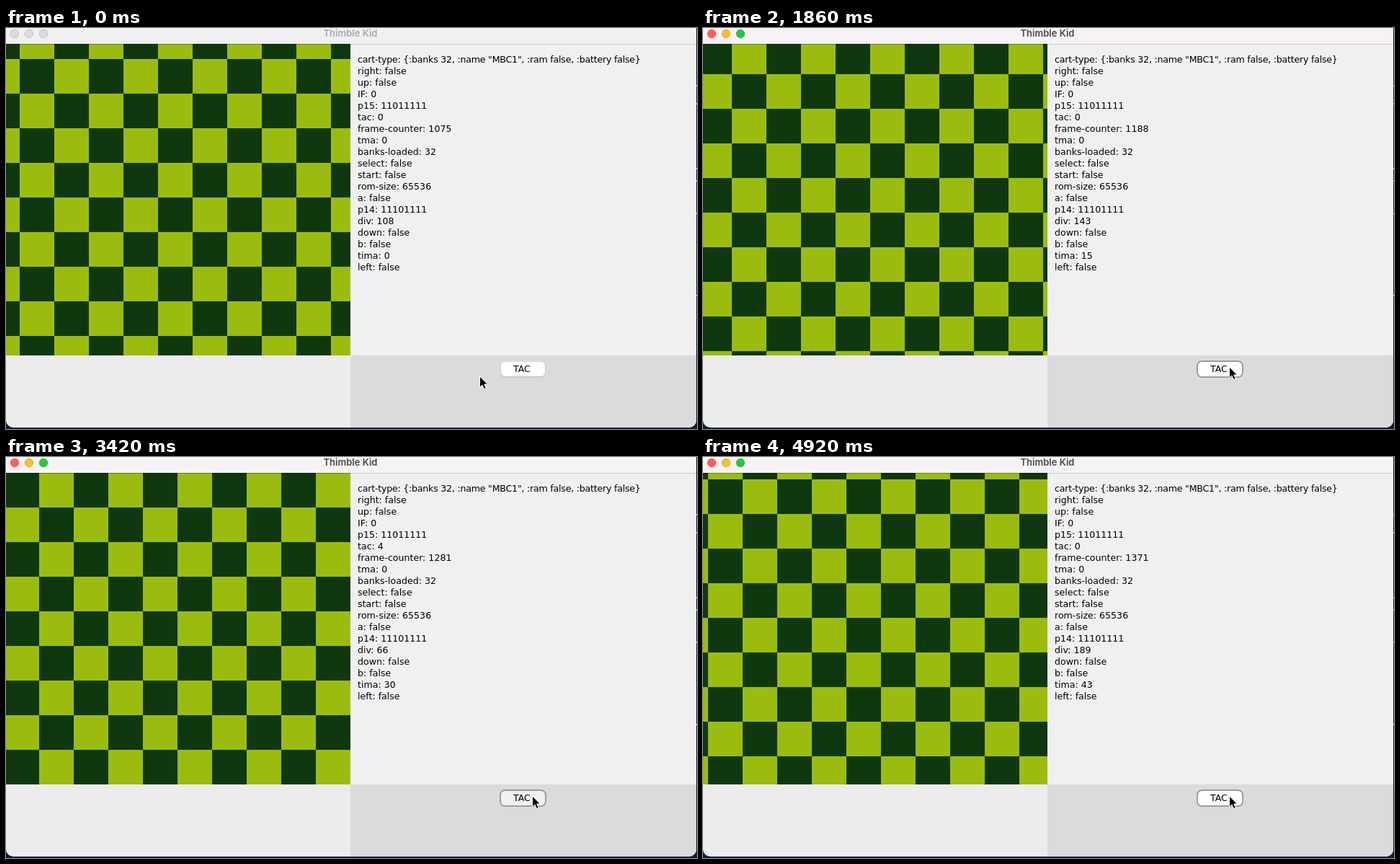
An HTML page that plays this animation: 959x556 px, repeating every 4940 ms.

```html
<!DOCTYPE html>
<html lang="en">
<head>
<meta charset="utf-8">
<title>Thimble Kid</title>
<style>
  html, body { margin: 0; width: 100%; height: 100%; overflow: hidden; background: #0b1f3a; }
  svg { display: block; width: 959px; height: 556px; }
  text { font: 12.6px "DejaVu Sans", sans-serif; fill: #000; white-space: pre; }
  .title { font: 600 13px Inter, sans-serif; fill: #4a474a; text-anchor: middle; }
  .bar { fill: #f7f2f6; }
  .ring { fill: #a8989e; }
  .face { fill: #fff; }
  .pressed .face { fill: #f0f0f0; }
  .idle .bar { fill: #f0f0f0; }
  .idle .title { fill: #a9a9a9; }
  .idle .light { fill: #dcdcdc; stroke: #b9b9b9; }
  .idle .ring { fill: none; }
  .light { stroke-width: .8; }
</style>
</head>
<body>
<svg id="stage" class="idle" viewBox="0 0 959 556">
  <defs>
    <pattern id="checker" width="96" height="96" patternUnits="userSpaceOnUse">
      <path d="M0 0h96v96h-96z" fill="#9bbc0f" shape-rendering="crispEdges"/>
      <path d="M0 0h48v96h48v-48h-96z" fill="#0f380f" shape-rendering="crispEdges"/>
    </pattern>
    <clipPath id="window"><path d="M0 0H958V544a10 10 0 0 1-10 10H10a10 10 0 0 1-10-10z"/></clipPath>
  </defs>

  <path d="M0 0H959V556H0z" fill="#0b1f3a"/>
  <path d="M958 80h1M958 105h1M958 195h1M958 212h1M958 257h1M958 371h1" stroke="#9fb0c4" stroke-width="2"/>
  <g clip-path="url(#window)">
    <path d="M0 0H958V554H0z" fill="#ececec"/>
    <path class="bar" d="M0 0H958V22H0z"/>
    <path d="M478 22H958V454H478z" fill="#f0f0f0"/>
    <path d="M478 454H958V554H478z" fill="#dbdbdb"/>
    <path d="M478 22H958V23H478z" fill="#cbc9cb"/>
    <path d="M0 22H478V454H0z" fill="url(#checker)"/>
    <path d="M0 22H478V23H0z" fill="#000" opacity=".3"/>
  </g>

  <circle class="light" cx="12" cy="8" r="5.7" fill="#fe5f57" stroke="#e2463f"/>
  <circle class="light" cx="32" cy="8" r="5.7" fill="#febc2e" stroke="#e0a028"/>
  <circle class="light" cx="52" cy="8" r="5.7" fill="#28c840" stroke="#1dad2b"/>
  <text class="title" x="478" y="12">Thimble Kid</text>

  <g id="info"></g>

  <rect x="686.5" y="463" width="62" height="21.5" rx="6" fill="#bdbdbd"/>
  <rect class="ring" x="685" y="461" width="65" height="24" rx="7.5"/>
  <rect class="face" x="687" y="463" width="61" height="20" rx="5.5"/>
  <text x="704" y="477">TAC</text>

  <path id="cursor" d="M0 0V15.2L3.5 12 6 17.6 8.7 16.4 6.3 11H11z" fill="#000" stroke="#fff" stroke-width="1" stroke-linejoin="round"/>
</svg>

<script>
const LOOP = 4940;
const FOCUS_AT = 500;
const TIMER_RATE = 0.0161;   // timer ticks per ms
const DIV_RATE = 18.436;     // divider steps per emulated frame, modulo 256

// [time, emulated frame count]
const pace = [[0, 1075], [850, 1128], [1380, 1159], [2400, 1221],
              [3420, 1281], [4020, 1318], [4920, 1371]];
// [press, release]; each release flips the timer switch
const clicks = [[670, 850], [1740, 1800], [2340, 2460],
                [3300, 3480], [3840, 3960], [4560, 4680]];

const rows = [
  ['cart-type', '{:banks 32, :name "MBC1", :ram false, :battery false}'],
  ['right', false], ['up', false], ['IF', 0], ['p15', 11011111], ['tac', 0],
  ['frame-counter', 1075], ['tma', 0], ['banks-loaded', 32], ['select', false],
  ['start', false], ['rom-size', 65536], ['a', false], ['p14', 11101111],
  ['div', 108], ['down', false], ['b', false], ['tima', 0], ['left', false]
];

const byId = id => document.getElementById(id);
const stage = byId('stage'), checker = byId('checker'), cursor = byId('cursor');
const fields = {};

rows.forEach(([key, value], i) => {
  const el = document.createElementNS('http://www.w3.org/2000/svg', 'text');
  el.setAttribute('x', 488);
  el.setAttribute('y', 48 + 16 * i);
  if (i === 0) el.style.letterSpacing = '-.22px';
  byId('info').append(el);
  fields[key] = el;
  show(key, value);
});

function show(key, value) {
  const text = `${key}: ${value}`;
  if (fields[key].textContent !== text) fields[key].textContent = text;
}

// The picture refreshes in small, uneven ticks
function tick(t) {
  const snap = (from, step) => from + step * Math.floor((t - from) / step);
  if (t < 90) return 0;
  if (t < 600) return snap(90, 51);
  if (t < 630) return 600;
  if (t < 900) return snap(630, 55);
  return snap(900, 60);
}

function frameCount(t) {
  let i = 1;
  while (i < pace.length - 1 && t > pace[i][0]) i++;
  const [t0, c0] = pace[i - 1], [t1, c1] = pace[i];
  return Math.round(c0 + (c1 - c0) * (t - t0) / (t1 - t0));
}

function timer(t) {
  let ms = 0;
  for (let i = 0; i < clicks.length; i += 2) {
    const on = clicks[i][1], off = clicks[i + 1][1];
    ms += Math.max(0, Math.min(t, off) - on);
  }
  return Math.floor(ms * TIMER_RATE);
}

function draw(t) {
  const count = frameCount(t);
  const scroll = 15 - Math.floor(count / 2) % 16;
  const x = 1 + 3 * scroll;
  checker.setAttribute('patternTransform', `translate(${x} ${x + 24})`);

  const flips = clicks.filter(c => t >= c[1]).length;
  show('tac', flips % 2 * 4);
  show('frame-counter', count);
  show('div', Math.round(108 + DIV_RATE * (count - 1075)) % 256);
  show('tima', timer(t));

  stage.classList.toggle('idle', t < FOCUS_AT);
  stage.classList.toggle('pressed', clicks.some(([a, b]) => t >= a && t < b));

  const k = Math.min(1, Math.max(0, (t - 60) / 600));
  const ease = k * k * (3 - 2 * k);
  cursor.setAttribute('transform', `translate(${657.5 + 73 * ease} ${483 - 13 * ease})`);
}

const start = performance.now();
function loop() {
  draw(tick((performance.now() - start) % LOOP));
  requestAnimationFrame(loop);
}
loop();
</script>
</body>
</html>
```
